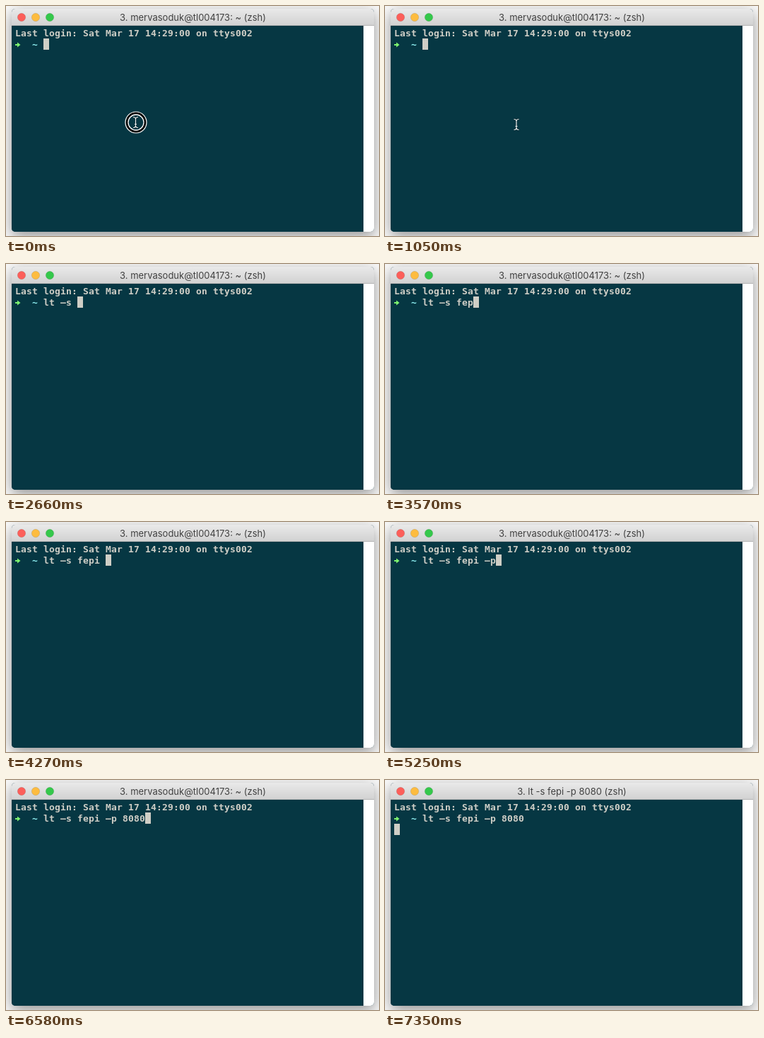
These frames come from a looping animation (528 px wide and 326 px high, 8000 ms). An HTML page with a canvas:

```html
<!DOCTYPE html>
<html lang="en">
<head>
<meta charset="utf-8">
<title>Terminal</title>
<style>
  html, body { margin: 0; width: 100%; height: 100%; overflow: hidden; background: #fafafa; }
  canvas { display: block; }
</style>
</head>
<body>
<canvas id="stage" width="528" height="326"></canvas>
<script>
const ctx = document.getElementById('stage').getContext('2d');
const LOOP = 8000, ENTER = 7350, STEP = 70;
const CELL = 8, LINE = 16, LEFT = 13, TOP = 30;
const INK = '#cfcec6', TEAL = '#063743';

const command = 'lt –s fepi –p 8080';
// moment at which each character of the command appears
const keys = [1120, 1260, 1610, 1890, 2100, 2660, 3150, 3360, 3570, 3780,
              4200, 4760, 5250, 5530, 6020, 6230, 6510, 6580];

function rect(x, y, w, h, color) {
  ctx.fillStyle = color;
  ctx.fillRect(x, y, w, h);
}

function circle(x, y, r) {
  ctx.beginPath();
  ctx.arc(x, y, r, 0, Math.PI * 2);
}

function type(text, col, row, color) {
  ctx.font = 'bold 13px "DejaVu Sans Mono", monospace';
  ctx.textAlign = 'left';
  ctx.fillStyle = color;
  [...text].forEach((c, i) =>
    ctx.fillText(c, LEFT + (col + i) * CELL, TOP + row * LINE + 13));
}

function drawWindow(title) {
  rect(0, 0, 528, 326, '#fafafa');
  ctx.save();
  ctx.beginPath();
  ctx.roundRect(8, 4, 513, 316, 5);
  ctx.shadowColor = 'rgba(0,0,0,.42)';
  ctx.shadowBlur = 20;
  ctx.shadowOffsetY = 6;
  ctx.fillStyle = TEAL;
  ctx.fill();
  ctx.shadowColor = 'transparent';
  ctx.clip();

  const bar = ctx.createLinearGradient(0, 4, 0, 27);
  bar.addColorStop(0, '#e9e9e9');
  bar.addColorStop(1, '#d2d2d2');
  rect(8, 4, 513, 23, bar);
  rect(8, 27, 513, 1, '#b4b4b4');
  rect(8, 28, 498, 292, TEAL);
  rect(506, 28, 15, 292, '#fff');
  ctx.restore();

  ['#fc5f5a', '#fdbc40', '#35c84b'].forEach((color, i) => {
    circle(22 + i * 20, 16, 5.7);
    ctx.fillStyle = color;
    ctx.fill();
    ctx.lineWidth = 0.6;
    ctx.strokeStyle = 'rgba(0,0,0,.18)';
    ctx.stroke();
  });

  ctx.font = '13px Inter, sans-serif';
  ctx.textAlign = 'center';
  ctx.fillStyle = '#414141';
  ctx.fillText(title, 264.5, 21);
}

function drawPrompt() {
  type('Last login: Sat Mar 17 14:29:00 on ttys002', 0, 0, INK);
  rect(13, 54, 4, 2, '#7df36f');
  ctx.beginPath();
  ctx.moveTo(16, 51.5);
  ctx.lineTo(20.5, 55);
  ctx.lineTo(16, 58.5);
  ctx.fill();
  type('~', 3, 1, '#8ff0f2');
}

function drawPointer(x, y) {
  ctx.beginPath();
  for (const s of [-1, 1]) {
    for (const d of [-1, 1]) {
      ctx.moveTo(x + d * 3.5, y + s * 7.5);
      ctx.quadraticCurveTo(x, y + s * 7.5, x, y + s * 4.5);
    }
  }
  ctx.moveTo(x, y - 5);
  ctx.lineTo(x, y + 5);
  ctx.moveTo(x - 1.5, y + 2.5);
  ctx.lineTo(x + 1.5, y + 2.5);
  ctx.lineWidth = 2.4;
  ctx.strokeStyle = 'rgba(0,0,0,.3)';
  ctx.stroke();
  ctx.lineWidth = 1.2;
  ctx.strokeStyle = '#f2f4f4';
  ctx.stroke();
}

// click highlight: black ring between two white lines
function drawRing(x, y, alpha) {
  ctx.globalAlpha = alpha;
  for (const [r, width, color] of [[13, 4.5, '#000'], [15, 1.2, '#fff'], [11, 1.3, '#fff']]) {
    circle(x, y, r);
    ctx.lineWidth = width;
    ctx.strokeStyle = color;
    ctx.stroke();
  }
  ctx.globalAlpha = 1;
}

function draw(t) {
  const count = keys.filter(k => k <= t).length;
  const entered = t >= ENTER;

  drawWindow(entered ? '3. lt -s fepi -p 8080 (zsh)' : '3. mervasoduk@tl004173: ~ (zsh)');
  drawPrompt();
  type(command.slice(0, count), 5, 1, INK);

  const col = entered ? 0 : 5 + count, row = entered ? 2 : 1;
  rect(LEFT + col * CELL, TOP + row * LINE, CELL, LINE, INK);

  const fade = 1 - Math.floor(t / STEP) / 5;
  if (fade > 0) drawRing(184, 165, fade);
  if (t < 560) drawPointer(183.5, 165);
  else if (count === 0) drawPointer(186, 168);
}

function tick() {
  draw(performance.now() % LOOP);
  requestAnimationFrame(tick);
}
tick();
</script>
</body>
</html>
```
